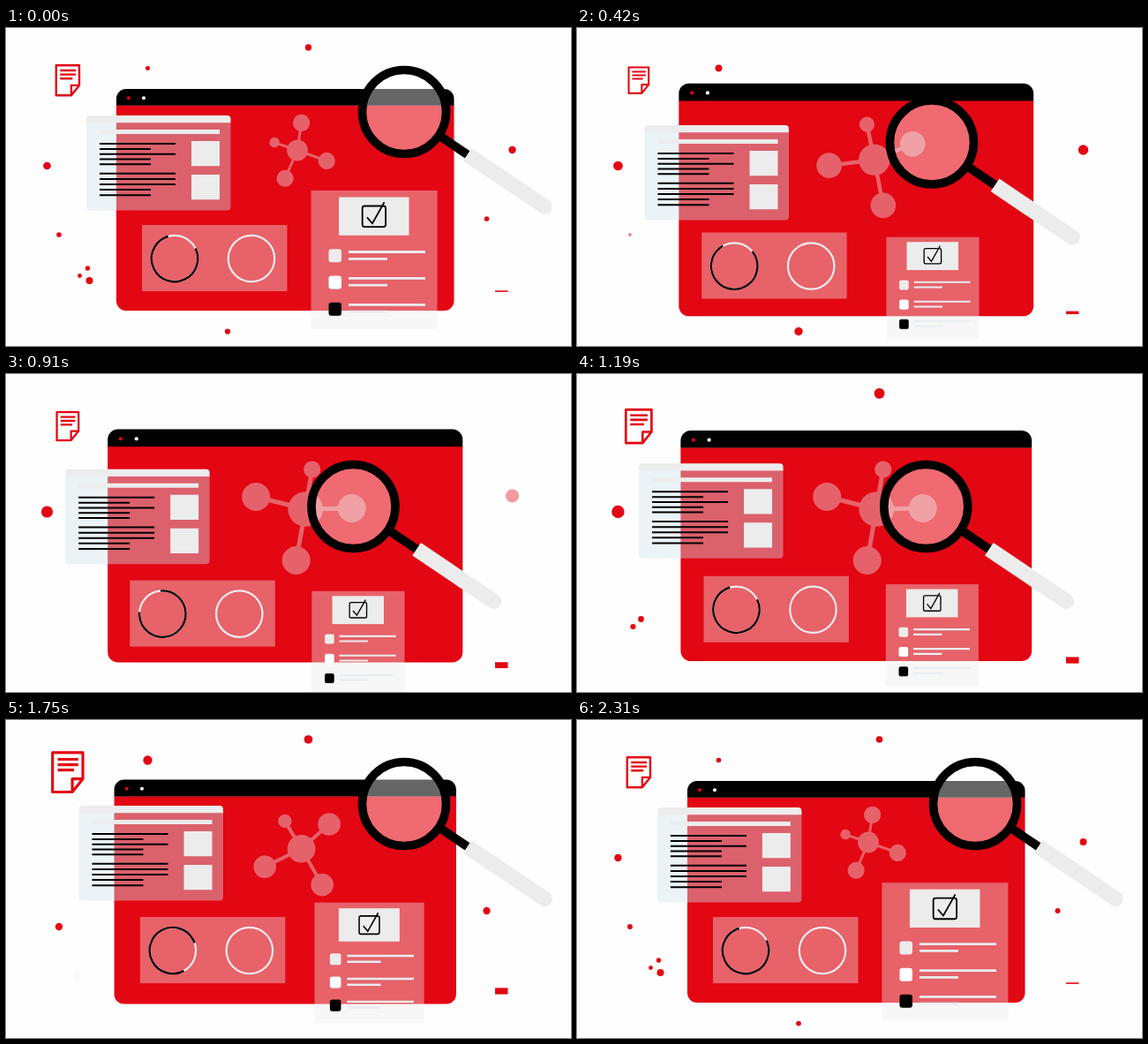
These frames come from a looping animation (640x360 px, 2380 ms). An HTML page:

```html
<!DOCTYPE html>
<html lang="en">
<head>
<meta charset="utf-8">
<title>Research dashboard</title>
<style>
  html, body { margin: 0; width: 100%; height: 100%; overflow: hidden; background: #fefefe; }
  svg { display: block; width: 100vw; height: 100vh; }
  .red { fill: #e30613; }
  .pale { fill: #ececec; }
  .glass { fill: #ececec; fill-opacity: .4; }
  .ink { fill: none; stroke: #000; }
  .rule { fill: none; stroke: #e8edf1; stroke-width: 2.8; }
  .ring { fill: none; stroke: #ececec; stroke-width: 2.2; }
  .icon { fill: none; stroke: #e30613; stroke-width: 2.4; }
  .links { fill: none; stroke: #ececec; stroke-width: 5; }
</style>
</head>
<body>
<svg viewBox="0 0 640 360">
  <g id="dots" class="red"></g>
  <rect id="dash" class="red" x="554" width="14.5"/>

  <g id="icon" class="icon">
    <path d="M-13.2-17H13V5.7L3.9 17H-13.2ZM3.9 17V5.7H13" stroke-linejoin="round"/>
    <path d="M-8.7-11.2H9M-8.7-6.6H9M-8.7-2H5.3"/>
  </g>

  <g id="win">
    <path class="red" d="M-191.3-107H191.2V114.5a11 11 0 0 1-11 11H-180.3a11 11 0 0 1-11-11Z"/>
    <path d="M-191.3-106.7V-114.5a11 11 0 0 1 11-11H180.2a11 11 0 0 1 11 11V-106.7Z"/>
    <circle class="red" cx="-177.3" cy="-115.3" r="2"/>
    <circle cx="-160.3" cy="-115.3" r="2" fill="#fff"/>
  </g>

  <g id="charts">
    <rect class="glass" width="164.5" height="75"/>
    <circle class="ring" cx="37" cy="38" r="26.2"/>
    <circle id="arc" class="ink" r="26.2" stroke-width="2.2" pathLength="360" stroke-dasharray="280 80"/>
    <circle class="ring" cx="124" cy="38" r="26.2"/>
  </g>

  <g id="card">
    <path d="M0 8H163.5V103.5a4 4 0 0 1-4 4H4a4 4 0 0 1-4-4Z" fill="#cee2eb" fill-opacity=".41"/>
    <path class="pale" d="M0 8.3V4a4 4 0 0 1 4-4H159.5a4 4 0 0 1 4 4V8.3Z"/>
    <path class="pale" d="M15 16H151v5H15ZM119 29h32v28.2h-32ZM119 67h32v28.2h-32Z"/>
    <path id="text" class="ink" stroke-width="2"/>
  </g>

  <g id="mol" opacity=".4">
    <path class="links" d="M0 0L7.5-45M0 0L-56-14M0 0L-10.5 58M0 0L52.5-1"/>
    <g class="pale">
      <circle r="19.8"/>
      <circle cx="7.5" cy="-45" r="9.6"/>
      <circle cx="-56" cy="-14" r="16"/>
      <circle cx="-10.5" cy="58" r="16"/>
      <circle cx="52.5" cy="-1" r="16"/>
    </g>
  </g>

  <g id="list">
    <rect class="glass" x="-71.5" y="-78.5" width="143" height="157"/>
    <g transform="translate(-71.5 -79.2)">
      <rect class="pale" x="31.5" y="8.2" width="79.5" height="43.3"/>
      <rect class="ink" x="58.2" y="18.2" width="26.4" height="23.6" rx="2.5" stroke-width="1.8"/>
      <path class="ink" d="M63.5 31L69.5 38L83 14" stroke-width="1.8"/>
      <rect class="pale" x="20" y="67" width="14.5" height="15" rx="3"/>
      <rect x="20" y="97.2" width="14.5" height="15" rx="3" fill="#fff"/>
      <rect x="20" y="127.4" width="14.5" height="15" rx="3"/>
      <path id="rules" class="rule"/>
    </g>
  </g>

  <g id="lens">
    <circle r="46" fill="#fff" fill-opacity=".4"/>
    <circle class="ink" r="47.5" stroke-width="9.6"/>
    <g transform="rotate(34)">
      <path class="ink" d="M50 0H87" stroke-width="10"/>
      <path class="pale" d="M86.4-8.7H192a8.7 8.7 0 0 1 0 17.4H86.4Z"/>
    </g>
  </g>
</svg>
<script>
const LOOP = 2380, STEP = 70;
const $ = id => document.getElementById(id);
const set = (el, attrs) => { for (const k in attrs) el.setAttribute(k, attrs[k]); };
const clamp = u => Math.max(0, Math.min(1, u));
const mix = (a, b, k) => a + (b - a) * k;

// Sine ease from 0 at time a to 1 at time b.
const ease = (t, a, b) => (1 - Math.cos(Math.PI * clamp((t - a) / (b - a)))) / 2;
// Goes out from a to b, and comes back from c to d.
const swing = (t, a, b, c, d) => ease(t, a, b) * (1 - ease(t, c, d));

function place(id, x, y, scale = 1, turn = 0) {
  set($(id), { transform: `translate(${x} ${y}) rotate(${turn}) scale(${scale})` });
}

// Two paragraphs of long and short lines, and three list entries
const lines = (y, gap, pattern) =>
  [...pattern].map((c, i) => `M15 ${y + gap * i}h${c === "L" ? 86 : 58}`).join("");
set($("text"), { d: lines(32.1, 5.8, "LSLSS") + lines(65.8, 6.1, "LLLSS") });
set($("rules"), { d: [0, 1, 2].map(i => `M42.5 ${70.2 + 29.9 * i}h87m-87 7.8h44`).join("") });

// Each dot fades in and out, its radius runs from r0 to r1; times may pass the loop end.
const dots = [];
function dot(x, y, from, to, r0, r1 = r0, drift = 0) {
  const el = document.createElementNS("http://www.w3.org/2000/svg", "circle");
  $("dots").append(el);
  dots.push({ el, x, y, from, to, r0, r1, drift });
}
dot(342.5, 22, 1050, 2680, 6.2, 3.1);
dot(160.5, 45.5, 1620, 2500, 5.7, 2);
dot(160.5, 45.5, 2400, 3270, 3.7, 4.2);
dot(46.5, 156, 2100, 3730, 3.7, 7.6);
dot(60, 234, 1600, 2850, 4.5, 1.8);
dot(573.5, 138, 2080, 3330, 3.1, 7.7);
dot(544.5, 216, 1340, 2630, 5, 2.3);
dot(251, 343.5, 2080, 2960, 2, 5.3);
// A drifting cluster: the big dot and the pair take turns
dot(94.5, 286, 560, 880, 4.8, 4.8, 1);
dot(94.5, 286, 1747, 2630, 4, 4, 1);
for (const [from, to, r] of [[1050, 1340, 3.4], [1950, 2630, 2.7]]) {
  dot(92.5, 272, from, to, r, r, 1);
  dot(83.5, 280.5, from, to, r - .3, r - .3, 1);
}

function drawDots(t) {
  const away = swing(t, 0, 640, 1400, 2310);
  for (const d of dots) {
    const s = t < d.from ? t + LOOP : t;
    set(d.el, {
      cx: d.x - 20 * away * d.drift,
      cy: d.y + 5.5 * away * d.drift,
      r: mix(d.r0, d.r1, clamp((s - d.from) / (d.to - d.from))),
      opacity: clamp(Math.min(s - d.from, d.to - s) / 100)
    });
  }
}

function draw(t) {
  place("icon", 70, 59.2,
    1 - .23 * swing(t, 70, 700, 700, 1020) + .31 * swing(t, 1000, 1470, 1750, 2310));

  place("win", 316.3, 194.5, 1 + .059 * swing(t, 0, 560, 480, 2310));

  place("charts",
    mix(154, 139.5, swing(t, 0, 540, 700, 2100)),
    mix(223, 236, swing(t, 0, 700, 600, 1700)));

  // Two turns per half loop, slowing down to a rest
  const u = clamp(t % (LOOP / 2) / 1120);
  place("arc", 37, 38, 1, 720 * (1 - (1 - u) ** 1.4) - 26);

  place("card",
    mix(91, 67, swing(t, 0, 740, 830, 2380)),
    99 + 11 * swing(t, 0, 420, 700, 1400) - 2 * swing(t, 1400, 1750, 1750, 2310));

  const m = swing(t, 0, 640, 1190, 2310);
  place("mol", mix(330, 339.2, m), mix(138.5, 153, m), mix(.6, 1, m), -80.5 * (1 - m));

  const l = swing(t, 0, 650, 600, 2380);
  place("list", mix(417, 397.5, l), mix(262.5, 306.7, l),
    mix(1, .735, swing(t, 0, 420, 1190, 2310)));

  place("lens",
    mix(451, 393.5, swing(t, 0, 560, 1120, 1750)),
    mix(95, 150, swing(t, 30, 700, 1180, 1750)));

  const y = mix(298, 331, swing(t, 0, 640, 700, 2310));
  const h = mix(1.6, 7.2, swing(t, 0, 1100, 1750, 2310));
  set($("dash"), { y: y - h / 2, height: h });

  drawDots(t);
}

const start = performance.now();
function tick() {
  const t = (performance.now() - start) % LOOP;
  draw(Math.floor(t / STEP) * STEP);
  requestAnimationFrame(tick);
}
tick();
</script>
</body>
</html>
```
